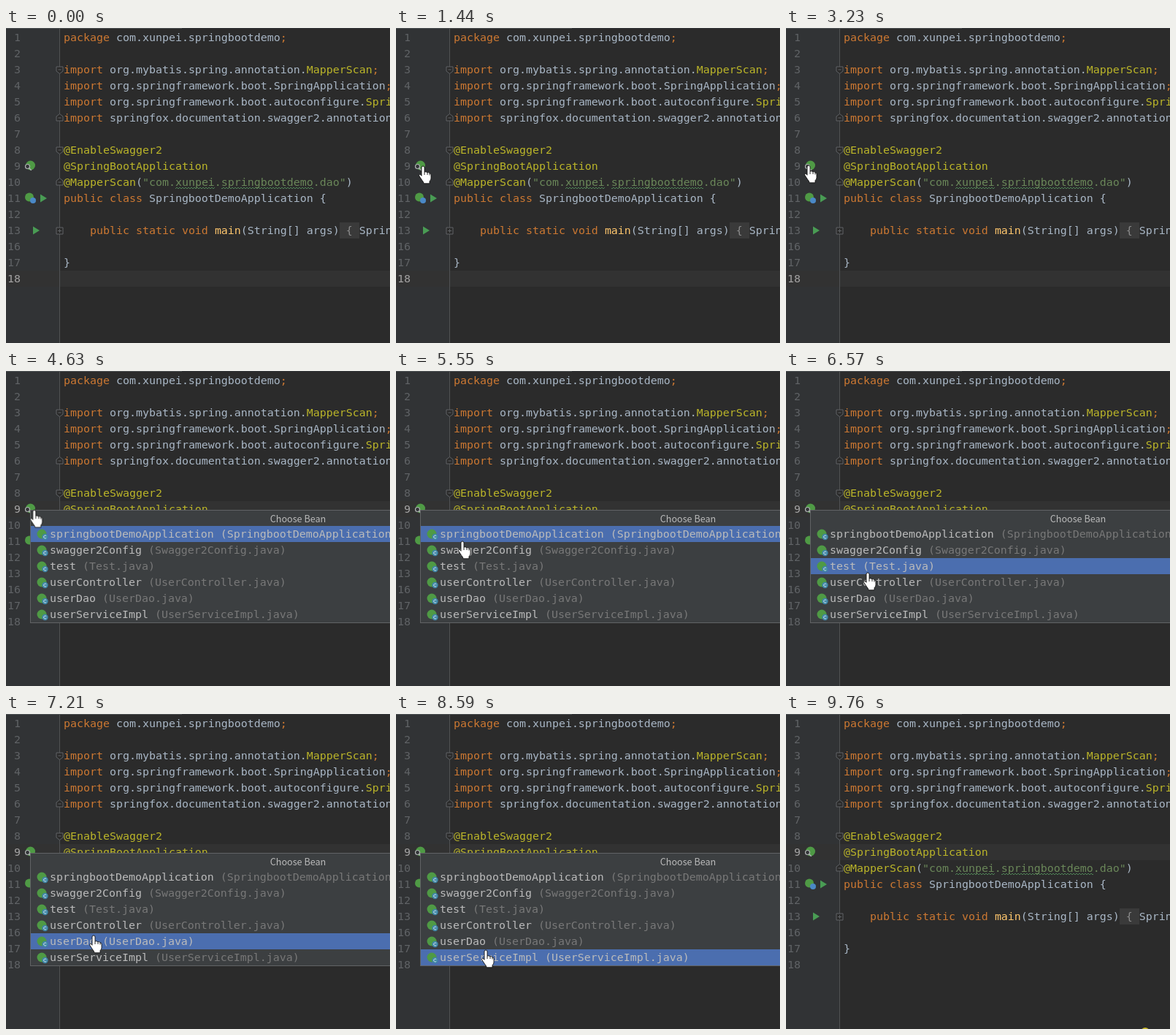
Write an HTML page that moves like this. It is 526 px wide and 431 px high and loops after 9.93 s.

```html
<!DOCTYPE html>
<html lang="en">
<head>
<meta charset="utf-8">
<title>Choose Bean</title>
<style>
html, body { margin: 0; width: 100%; height: 100%; overflow: hidden; background: #2b2b2b; }
#stage {
  position: relative; width: 526px; height: 431px; overflow: hidden;
  background: linear-gradient(90deg, #313335 73px, #505254 73px 74px, #2b2b2b 74px);
  font: 14.95px/22px "DejaVu Sans Mono", monospace; color: #a9b7c6;
  --loop: 9930ms step-end infinite;
}
#stage > * { position: absolute; }
pre { margin: 0; font: inherit; }
svg { left: 0; top: 0; overflow: visible; }
.edge { left: 0; top: 0; width: 526px; height: 1px; background: linear-gradient(90deg, #4e5254 241px, #323537 241px); }

.nums, .caret { left: 0; text-align: right; color: #606366; }
.nums { top: 2px; width: 20px; }
.caret { width: 526px; height: 22px; background: #323232; color: #a4a3a3; }
.caret span { display: block; width: 20px; }
.caret::after { content: ""; position: absolute; left: 73px; top: 0; width: 1px; height: 22px; background: #505254; }
#last { top: 332px; animation: before-click var(--loop); }
#ninth { top: 178px; animation: after-click var(--loop); }

.code { left: 79px; top: 2px; }
.code b { font-weight: 400; color: #cc7832; }
.code i { font-style: normal; color: #bbb529; }
.code s { text-decoration: none; color: #6a8759; }
.code u { text-decoration: none; color: #ffc66d; }
.code em { font-style: normal; color: #8c8c8c; background: #3a3a3a; display: inline-block; height: 22px; vertical-align: top; }

#popup {
  left: 33px; top: 190px; width: 734px; height: 155px; box-sizing: border-box;
  border: 1px solid #616365; background: #3c3f41; color: #bbb;
  animation: popup var(--loop);
}
.title { height: 21px; font: 12.6px/21px "Noto Sans CJK SC", "Noto Sans CJK", "Noto Sans", sans-serif; text-align: center; }
.list { position: absolute; left: 0; top: 21px; width: 732px; height: 132px; }
.list div { position: relative; height: 22px; padding-left: 26px; white-space: pre; }
.list span { color: #787878; }
.list svg { position: absolute; left: 15px; top: 11px; width: 1px; height: 1px; }
.list.on { background: #4b6eaf; animation: pick var(--loop); }
.list.on span { color: inherit; }

#bulb { left: 486px; top: 429px; width: 12px; height: 12px; border-radius: 50%; background: #c9b92c; animation: bulb var(--loop); }
#cursor { width: 1px; height: 1px; animation: move var(--loop); }
#hand { animation: hand var(--loop); }
#beam { animation: beam var(--loop); }

@keyframes before-click { 0% { opacity: 1 } 44.209%, 100% { opacity: 0 } }
@keyframes after-click { 0% { opacity: 0 } 44.209%, 100% { opacity: 1 } }
@keyframes popup { 0% { opacity: 0 } 45.015% { opacity: 1 } 98.288%, 100% { opacity: 0 } }
@keyframes bulb { 0% { opacity: 0 } 98.288%, 100% { opacity: 1 } }
@keyframes hand { 0% { opacity: 0 } 12.155% { opacity: 1 } 88.066%, 100% { opacity: 0 } }
@keyframes beam {
  0% { opacity: 0 } 4.431% { opacity: 1 } 12.155% { opacity: 0 }
  88.066% { opacity: 1 } 92.749%, 100% { opacity: 0 }
}
@keyframes pick {
  0% { clip-path: inset(0 0 110px) }
  56.697% { clip-path: inset(22px 0 88px) }
  61.43% { clip-path: inset(44px 0 66px) }
  67.069% { clip-path: inset(66px 0 44px) }
  72.608% { clip-path: inset(88px 0 22px) }
  80.363%, 100% { clip-path: inset(110px 0 0) }
}
@keyframes move {
  0% { transform: translate(433px, 409px) }
  4.431% { transform: translate(433px, 409px); animation-timing-function: steps(6) }
  9.063% { transform: translate(150px, 265px); animation-timing-function: steps(6) }
  13.696% { transform: translate(37px, 194px) }
  14.502% { transform: translate(37px, 189px) }
  16.213% { transform: translate(36px, 188px) }
  17.724% { transform: translate(35px, 187px) }
  26.183% { transform: translate(34px, 187px) }
  29.406% { transform: translate(33px, 187px) }
  32.527% { transform: translate(31px, 188px) }
  44.209% { transform: translate(32px, 188px); animation-timing-function: steps(4) }
  47.432% { transform: translate(41px, 191px) }
  53.575% { transform: translate(52px, 200px); animation-timing-function: steps(3) }
  55.891% { transform: translate(91px, 233px) }
  56.697% { transform: translate(93px, 235px) }
  58.408% { transform: translate(94px, 237px); animation-timing-function: steps(6) }
  62.94% { transform: translate(109px, 273px) }
  66.163% { transform: translate(112px, 276px) }
  67.069% { transform: translate(114px, 282px) }
  67.875% { transform: translate(116px, 291px) }
  71.701% { transform: translate(118px, 297px) }
  72.608% { transform: translate(120px, 303px) }
  73.413% { transform: translate(120px, 304px) }
  79.556% { transform: translate(121px, 313px) }
  80.362% { transform: translate(122px, 322px) }
  86.505% { transform: translate(123px, 323px); animation-timing-function: steps(8) }
  92.749%, 100% { transform: translate(450px, 431px) }
}
</style>
</head>
<body>
<div id="stage">
  <div class="edge"></div>
  <pre class="nums">1
2
3
4
5
6
7
8
9
10
11
12
13
16
17
18</pre>
  <div class="caret" id="last"><span>18</span></div>
  <div class="caret" id="ninth"><span>9</span></div>

  <svg width="526" height="431" fill="none">
    <defs>
      <pattern id="wave" width="4" height="4" y="217" patternUnits="userSpaceOnUse">
        <path d="M0 3L2 1L4 3" stroke="#4f8457"/>
      </pattern>
      <path id="fold" d="M-4.5 -4.5h9v6l-4.5 3.5l-4.5 -3.5zM-2 -.5h4"/>
      <path id="run" d="M-4.5 -5.5L4.5 0L-4.5 5.5z" fill="#499c54"/>
      <g id="bean">
        <circle r="6.5" fill="#4f9a45"/>
        <circle cx="4.5" cy="4" r="4.2" fill="#3f86a8"/>
        <path d="M6.2 2.7a2 2 0 1 0 0 2.6" fill="none" stroke="#d5e3ea"/>
      </g>
    </defs>
    <g fill="#2b2b2b" stroke="#606366">
      <use href="#fold" x="73.5" y="57.5"/>
      <use href="#fold" transform="translate(73.5 122.5) scale(1 -1)"/>
      <use href="#fold" x="73.5" y="167.5"/>
      <use href="#fold" transform="translate(73.5 210.5) scale(1 -1)"/>
      <path d="M69 273h9v9h-9zM71 277.5h5M73.5 275v5"/>
    </g>
    <circle cx="33.5" cy="188" r="6.5" fill="#4f9a45"/>
    <circle cx="29.5" cy="189.5" r="3" fill="#313335" stroke="#afb1b3" stroke-width="1.2"/>
    <path d="M31.7 191.7l3 3" stroke="#afb1b3" stroke-width="1.5"/>
    <circle cx="32" cy="231.5" r="6" fill="#4f9a45"/>
    <circle cx="37" cy="236" r="4" fill="#4a88c7"/>
    <use href="#run" x="51.5" y="233"/>
    <use href="#run" x="41.5" y="277"/>
    <path d="M232 217h54v4h-54zM295 217h126v4h-126z" fill="url(#wave)"/>
  </svg>

  <pre class="code"><b>package</b> com.xunpei.springbootdemo<b>;</b>

<b>import</b> org.mybatis.spring.annotation.<i>MapperScan</i><b>;</b>
<b>import</b> org.springframework.boot.SpringApplication<b>;</b>
<b>import</b> org.springframework.boot.autoconfigure.<i>SpringBootApplication</i><b>;</b>
<b>import</b> springfox.documentation.swagger2.annotations.<i>EnableSwagger2</i><b>;</b>

<i>@EnableSwagger2</i>
<i>@SpringBootApplication</i>
<i>@MapperScan</i>(<s>"com.xunpei.springbootdemo.dao"</s>)
<b>public class</b> SpringbootDemoApplication {

    <b>public static void</b> <u>main</u>(String[] args)<em> { </em>SpringApplication.run(

}</pre>

  <div id="popup">
    <div class="title">Choose Bean</div>
  </div>
  <div id="bulb"></div>

  <svg id="cursor">
    <g id="hand" stroke="#111" stroke-width=".9">
      <path fill="#fff" d="M-2 2a2 2 0 0 1 4 0v6q2-1 4 .8q2-.8 3 1q2 0 2 2v5q0 2-2 4v3h-8q0-2-2-4l-4-6q-1-2 .5-2.5q1.5 0 2.5 2z"/>
      <path d="M2 8v4M6 9v3M9 10v2.5"/>
    </g>
    <path id="beam" fill="none" stroke="#d8d8d8" d="M-3.5 -8.5h3l.5 .5l.5 -.5h3M0 -8v16M-3.5 8.5h3l.5 -.5l.5 .5h3"/>
  </svg>
</div>
<script>
const beans = ["springbootDemoApplication", "swagger2Config", "test", "userController", "userDao", "userServiceImpl"];
const rows = beans.map(name => {
  const file = name[0].toUpperCase() + name.slice(1) + ".java";
  return `<div><svg><use href="#bean"/></svg>${name} <span>(${file})</span></div>`;
}).join("");

// The second copy is the selected look, clipped to one row.
document.getElementById("popup").insertAdjacentHTML("beforeend",
  `<div class="list">${rows}</div><div class="list on" aria-hidden="true">${rows}</div>`);
</script>
</body>
</html>
```
